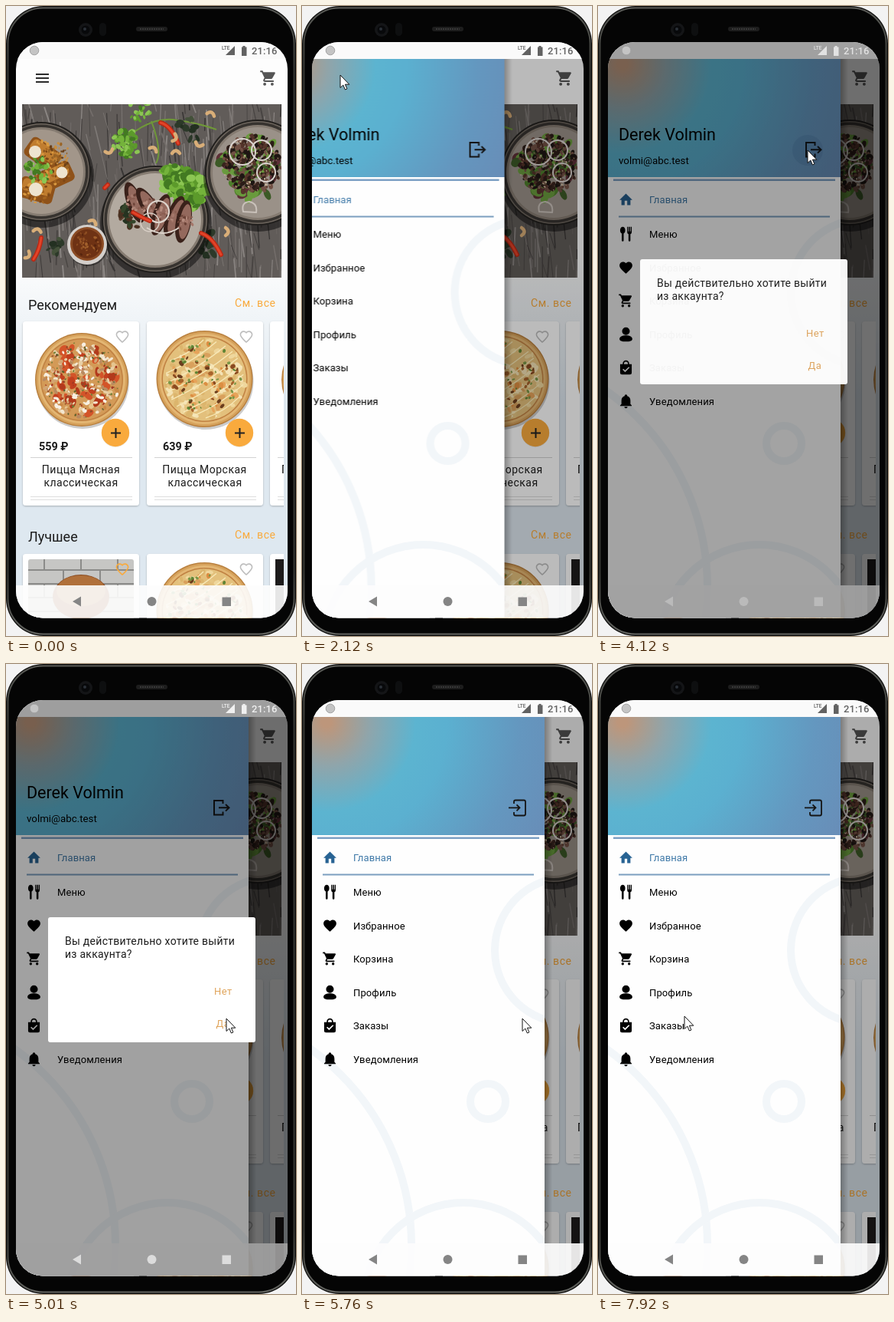
These frames come from a looping animation (379x821 px, 7.99 s). An HTML page:

```html
<!DOCTYPE html>
<html lang="ru">
<head>
<meta charset="utf-8">
<title>Пиццерия</title>
<style>
  html, body { margin: 0; width: 100%; height: 100%; overflow: hidden; background: #f3f3f3; }
  svg { display: block; width: 379px; height: 821px; font-family: Roboto, sans-serif; }
</style>
</head>
<body>
<svg id="stage" viewBox="0 0 379 821"></svg>
<script>
const LOOP = 7990;
const ORANGE = '#f9aa3d';

const randomizer = seed => () => (seed = (seed * 16807) % 2147483647) / 2147483647;

const text = (x, y, size, str, attrs = '') =>
  `<text x="${x}" y="${y}" font-size="${size}" ${attrs}>${str}</text>`;
const rect = (x, y, w, h, fill, attrs = '') =>
  `<rect x="${x}" y="${y}" width="${w}" height="${h}" fill="${fill}" ${attrs}/>`;
const circle = (x, y, r, fill, attrs = '') =>
  `<circle cx="${x}" cy="${y}" r="${r}" fill="${fill}" ${attrs}/>`;
const ring = (x, y, r, stroke, width) =>
  circle(x, y, r, 'none', `stroke="${stroke}" stroke-width="${width}"`);
const ellipse = (x, y, rx, ry, fill, turn = 0) =>
  `<ellipse rx="${rx}" ry="${ry}" fill="${fill}" transform="translate(${x} ${y}) rotate(${turn})"/>`;
const line = (d, stroke, width, attrs = '') =>
  `<path d="${d}" fill="none" stroke="${stroke}" stroke-width="${width}" ${attrs}/>`;
const icon = (d, x, y, scale, attrs = '') =>
  `<path d="${d}" transform="translate(${x - 12 * scale} ${y - 12 * scale}) scale(${scale})" ${attrs}/>`;

const ICONS = {
  cart: 'M7 18a2 2 0 1 0 0 4 2 2 0 0 0 0-4zM1 2v2h2l3.6 7.6-1.35 2.45C4.5 15.4 5.5 17 7 17h12v-2H7.4c-.2 0-.3-.2-.2-.4l.9-1.6h7.45c.75 0 1.4-.4 1.75-1L20.9 5.5A1 1 0 0 0 20 4H5.2l-.9-2zM17 18a2 2 0 1 0 0 4 2 2 0 0 0 0-4z',
  heart: 'M16.5 3c-1.7 0-3.4.8-4.5 2.1C10.9 3.8 9.2 3 7.5 3 4.4 3 2 5.4 2 8.5c0 3.8 3.4 6.9 8.5 11.5l1.5 1.3 1.5-1.3C18.6 15.4 22 12.3 22 8.5 22 5.4 19.6 3 16.5 3z',
  home: 'M10 21v-7h4v7h5v-8h3L12 3 2 13h3v8z',
  food: 'M7 1c5 0 5 9 1.5 10.5V22a1 1 0 0 1-3 0V11.5C2 10 2 1 7 1zM14 1h1.6v7h1V1h1.8v7h1V1H21v8c0 2-1 3-2 3.4V22a1 1 0 0 1-3 0v-9.6c-1-.4-2-1.4-2-3.4z',
  person: 'M12 1a6 6 0 1 0 0 12 6 6 0 0 0 0-12zM12 13.5C6 13.5 2 16 2 19s4 4 10 4 10-1 10-4-4-5.5-10-5.5z',
  bag: 'M7 7V6a5 5 0 0 1 10 0v1h4v13a3 3 0 0 1-3 3H6a3 3 0 0 1-3-3V7zM9 7h6V6a3 3 0 0 0-6 0zM8 14l-1.3 1.4 4 4 7-7L16.3 11l-5.6 5.5z',
  bell: 'M12 23a2.5 2.5 0 0 0 2.5-2.5h-5A2.5 2.5 0 0 0 12 23zm7-6.5V11c0-3.5-2-6.2-5-6.9V3.5a2 2 0 0 0-4 0v.6C7 4.8 5 7.5 5 11v5.5l-2 2v1h18v-1z'
};

function scatter(cx, cy, radius, count, size, colors, rnd) {
  let out = '';
  for (let i = 0; i < count; i++) {
    const a = rnd() * 6.283, d = radius * Math.sqrt(rnd()), s = size * (.6 + rnd() * .6);
    out += ellipse((cx + d * Math.cos(a)).toFixed(1), (cy + d * Math.sin(a)).toFixed(1),
      s.toFixed(1), (s * (.45 + rnd() * .4)).toFixed(1),
      colors[Math.floor(rnd() * colors.length)], Math.round(rnd() * 180));
  }
  return out;
}

const crust = (x, y, r, base) => circle(x + 1, y + 3, r, '#0003') + circle(x, y, r, '#b9803f') +
  circle(x, y, r - 1.5, '#d6a25c') + circle(x, y, r - 4, '#e3b673') + circle(x, y, r - 7, '#c08142') + circle(x, y, r - 8.5, base);

function meatPizza(x, y, r) {
  const rnd = randomizer(71);
  return crust(x, y, r, '#d39a57') +
    scatter(x, y, r - 12, 90, 3.5, ['#e6c58e', '#c98746', '#dcb27a'], rnd) +
    scatter(x, y, r - 15, 44, 6.5, ['#c2401f', '#d35429', '#b23a1c'], rnd) +
    scatter(x, y, r - 11, 190, 3, ['#f3e6cf', '#e8cfa6', '#d3a573', '#f8f0e2', '#b98a60'], rnd) +
    scatter(x, y, r - 11, 110, 1.6, ['#6f7c35', '#8f4a2a', '#a53822', '#59602d'], rnd);
}

function seaPizza(x, y, r) {
  const rnd = randomizer(29);
  let sauce = '';
  for (let i = -4; i <= 4; i++) {
    const half = Math.sqrt((r - 12) ** 2 - (i * 11) ** 2);
    sauce += `M${-half} ${i * 11}Q0 ${i * 11 + 6} ${half} ${i * 11}`;
  }
  return crust(x, y, r, '#e3c07c') +
    scatter(x, y, r - 11, 130, 4.5, ['#efd79d', '#f4e2b5', '#dcb56d', '#e6c684'], rnd) +
    scatter(x, y, r - 17, 44, 4, ['#dc8e42', '#e6a35a', '#d9a05c'], rnd) +
    line(sauce, '#f8eab9', 1.3, `transform="translate(${x} ${y}) rotate(-32)"`) +
    scatter(x, y, r - 18, 34, 3.4, ['#6b3d1d', '#8a4a20', '#a8642c'], rnd) +
    scatter(x, y, r - 15, 44, 2.2, ['#5f8434', '#7a9646'], rnd);
}

function hero() {
  const rnd = randomizer(11);
  let grain = '';
  for (let i = 0; i < 320; i++) {
    const x = 10 + rnd() * 360, y = 110 + rnd() * 230;
    grain += line(`M${x.toFixed(1)} ${y.toFixed(1)}l${(rnd() * 14 - 4).toFixed(1)} ${(14 + rnd() * 50).toFixed(1)}`,
      ['#7f7a77', '#484442', '#746e6b', '#393635', '#8b8683'][i % 5], (.5 + rnd() * 1.5).toFixed(1));
  }
  const plate = (x, y, r, fill) => circle(x + 1, y + 5, r + 3, '#0007') + circle(x, y, r, '#211f1d') +
    circle(x, y, r - 2, '#6d655d') + circle(x, y, r - 3.5, '#37332f') + circle(x, y, r - 7, '#857b71') + circle(x, y, r - 10, fill);
  const chili = d => line(d, '#b82814', 6, 'stroke-linecap="round"') + line(d, '#e24328', 3, 'stroke-linecap="round"');
  const cashew = (x, y, turn) => line('M-5 2Q0-5 5 2', '#d9ae78', 4.5,
    `stroke-linecap="round" transform="translate(${x} ${y}) rotate(${turn})"`);
  const greens = ['#5c9a2b', '#74b33b', '#437a22', '#8cc653'];
  const darkLeaves = ['#2c3929', '#233021', '#44513a'];
  const meat = ['#b58b7d', '#8a5d50', '#6b4237', '#a5786b'];
  return `<g clip-path="url(#heroClip)">${rect(21, 128, 339, 226, '#615c59')}${grain}` +
    line('M140 189Q180 145 218 148Q250 152 275 161M190 150Q205 190 196 205', '#6f9838', 2) +
    scatter(157, 180, 18, 46, 4.5, greens, rnd) + scatter(174, 136, 18, 24, 4, greens, rnd) +
    scatter(240, 163, 18, 12, 5, darkLeaves, rnd) +
    scatter(262, 311, 16, 18, 6, darkLeaves, rnd) + scatter(65, 312, 11, 10, 5, darkLeaves, rnd) +
    plate(46, 216, 65, '#a2968a') +
    [[48, 193, 35], [65, 222, -25], [40, 240, 15]].map(([x, y, a]) =>
      `<g transform="translate(${x} ${y}) rotate(${a})">${rect(-23, -14, 46, 28, '#8f5219', 'rx="6"')}${rect(-20, -12, 39, 16, '#c07d2f', 'rx="5"')}</g>` +
      scatter(x, y, 18, 34, 2.4, ['#d9993f', '#a4641f', '#7d4716'], rnd)).join('') +
    scatter(66, 197, 19, 60, 2.2, ['#9a6425', '#c98e3f', '#6b4018'], rnd) +
    scatter(42, 212, 18, 40, 3.8, greens, rnd) +
    circle(38, 190, 8, '#eee4cf') + circle(39, 239, 9, '#eee4cf') + circle(73, 217, 7.5, '#eee4cf') +
    plate(195, 278, 70, '#b3aaa0') +
    scatter(222, 226, 20, 60, 6, greens, rnd) + scatter(242, 242, 23, 90, 6.5, greens, rnd) +
    scatter(165, 272, 17, 44, 5, ['#34452a', '#4a3020', '#263321', '#5d4030'], rnd) +
    [[168, 256, 70], [187, 261, 58], [202, 272, 108], [220, 274, 112], [232, 281, 100]].map(([x, y, a]) =>
      ellipse(x, y, 28, 10, '#3a211a', a) + ellipse(x + 2, y, 23, 7, '#94695d', a) +
      scatter(x + 1, y, 11, 22, 2.2, meat, rnd)).join('') +
    ring(199, 268, 14, '#ded4cc', 2.2) + ring(188, 282, 12, '#d8cec5', 1.5) +
    line('M184 289Q205 303 226 289', '#ded4cc', 2) +
    plate(329, 217, 69, '#9a9188') +
    scatter(320, 211, 42, 70, 7, ['#4e7f2b', '#699a3d', '#5d2f36', '#3c5a26'], rnd) +
    scatter(322, 206, 38, 240, 3.6, ['#38241e', '#543429', '#1e1613', '#715044', '#2b1c17'], rnd) +
    scatter(322, 208, 38, 70, 1.4, ['#c9b49a', '#9c7d64'], rnd) +
    ring(309, 190, 17, '#d9d2ce', 2) + ring(334, 188, 13, '#d9d2ce', 2) + ring(340, 217, 12, '#d9d2ce', 2) +
    line('M310 268Q307 256 318 255Q329 257 327 269Z', '#c9c1ba', 2) +
    circle(107, 313, 26, '#0006') + circle(106, 311, 26, '#d3cfcb') + circle(106, 310, 22, '#8a4b24') +
    circle(106, 310, 19, '#6e3214') + scatter(106, 310, 16, 40, 1.8, ['#8d4d22', '#a2602c', '#57250e'], rnd) +
    chili('M202 152Q216 156 225 179') + chili('M255 296Q270 301 281 324') +
    chili('M46 302Q44 318 36 330') + chili('M166 269Q178 276 188 280') + chili('M129 237l4-4') +
    cashew(193, 186, 30) + cashew(222, 190, 0) + cashew(221, 172, 110) + cashew(268, 140, 20) + cashew(252, 181, 200) +
    cashew(289, 294, 90) + cashew(41, 292, 10) + cashew(29, 325, 120) + cashew(114, 281, 30) + cashew(135, 190, 160) + '</g>';
}

const outlineHeart = (x, y, color) => icon(ICONS.heart, x, y, .76, `fill="none" stroke="${color}" stroke-width="2.1"`);
const cardBox = (x, y) => rect(x, y, 152, 240, '#fff', 'rx="4" filter="url(#cardShadow)"');
const dishLine = (x, y, str) => text(x, y, 14, str, 'text-anchor="middle" fill="#1c1c1c" letter-spacing=".5"');

function dishCard(x, pizza, price, name) {
  const rule = (y, color) => rect(x + 10, y, 133, 1, color);
  return cardBox(x, 411) + pizza + outlineHeart(x + 130, 431, '#bdbdbd') +
    circle(x + 121, 557, 18.2, '#0001') + circle(x + 121, 556, 18.2, ORANGE) +
    line(`M${x + 115} 556.5h13M${x + 121.5} 550v13`, '#222', 2) +
    text(x + 21, 579, 14.4, price, 'font-weight="700" fill="#1c1c1c"') + rule(588, '#d2d2d2') + name +
    dishLine(x + 76, 626, 'классическая') + rule(639, '#dedede') + rule(643, '#dedede');
}

function burgerPhoto() {
  let bricks = '';
  for (let row = 0; row < 4; row++)
    bricks += line(`M29 ${735 + row * 18}h138M${50 + row % 2 * 25} ${717 + row * 18}v18m48-18v18m48-18v18`, '#8b8b89', 2);
  return `<g clip-path="url(#burgerClip)">${rect(29, 721, 138, 80, '#c6c6c4')}${bricks}` +
    ellipse(98, 770, 37, 29, '#8a4c22') + ellipse(98, 762, 32, 20, '#b0703a') + '</g>';
}

function home() {
  const title = (y, str) => text(29, y, 18, str, 'fill="#1c1c1c"') +
    text(299, y - 4, 14, 'См. все', `fill="${ORANGE}" letter-spacing=".6"`);
  return rect(13, 47, 355, 750, 'url(#appBg)') +
    line('M39 89h17M39 94h17M39 99h17', '#2b2b2b', 1.8) + icon(ICONS.cart, 343, 94, .98, 'fill="#555"') +
    hero() + title(396, 'Рекомендуем') + title(698, 'Лучшее') +
    '<g clip-path="url(#listClip)">' +
    dishCard(22, meatPizza(99, 487, 61), '559 ₽', dishLine(98, 609, 'Пицца Мясная')) +
    dishCard(184, seaPizza(259.5, 486, 63), '639 ₽',
      `<g id="seaName">${dishLine(259.5, 609, 'Пицца Морская')}</g><g id="newName">${dishLine(259.5, 609, 'Пицца Маргарита')}</g>`) +
    dishCard(345, meatPizza(421, 487, 61), '599 ₽', text(360, 609, 14, 'Пицца')) +
    cardBox(22, 714) + burgerPhoto() + outlineHeart(152, 734, ORANGE) +
    cardBox(184, 714) + seaPizza(259.5, 788, 63) + outlineHeart(314, 734, '#bdbdbd') +
    cardBox(345, 714) + rect(352, 721, 20, 80, '#1d1b1b') + '</g>';
}

function drawer() {
  const items = [['home', 'Главная', 252], ['food', 'Меню', 297], ['heart', 'Избранное', 341], ['cart', 'Корзина', 384],
    ['person', 'Профиль', 428], ['bag', 'Заказы', 471], ['bell', 'Уведомления', 515]];
  const menu = items.map(([name, label, y], i) =>
    icon(ICONS[name], 36.5, y, .84, `fill="${i ? '#000' : '#286393'}" fill-rule="evenodd"`) +
    text(67, y + 5, 13, label, `fill="${i ? '#000' : '#3f79a8'}" letter-spacing=".12"`)).join('');
  const pale = '#f2f6f9';
  return rect(317, 69, 10, 728, 'url(#edgeShadow)') +
    `<g clip-path="url(#drawerClip)">${rect(13, 69, 304, 728, '#fefefe')}` +
    ring(347, 373, 95, pale, 10) + ring(243, 570, 23, pale, 10) + ring(-170, 757, 313, pale, 10) + ring(211, 832, 130, pale, 10) +
    rect(13, 69, 304, 154, 'url(#header)') + rect(20, 225.5, 290, 2.5, '#7da0c4') + rect(27, 273.5, 276, 2, '#7c9fc0') +
    `<g id="account">${text(27, 175, 21.5, 'Derek Volmin')}${text(27, 206, 13.3, 'volmi@abc.test')}` +
    line('M283.5 182v-4h-11.5v18.5h11.5v-4M278 187.3h13M287 183l4.5 4.3-4.5 4.3', '#151515', 2) + '</g>' +
    `<g id="guest">${line('M277 182v-2.5q0-2 2-2h11q2 0 2 2v16q0 2-2 2h-11q-2 0-2-2v-2.5M270 187.3h14M280.5 183.3l4 4-4 4', '#151515', 1.8)}</g>` +
    circle(274, 188, 0, '#123a6b', 'id="ripple" opacity="0"') + menu + '</g>';
}

const dialog = () => rect(55, 330, 271, 163, '#fff', 'rx="3"') +
  text(77, 366, 14, 'Вы действительно хотите выйти', 'fill="#1c1c1c" letter-spacing=".27"') +
  text(77, 383, 14, 'из аккаунта?', 'fill="#1c1c1c" letter-spacing=".27"') +
  text(272, 431, 13, 'Нет', 'fill="#e0a55c" letter-spacing=".4"') +
  text(274.5, 473, 13, 'Да', 'fill="#e0a55c" letter-spacing=".4"');

const statusIcons = () => circle(37, 58, 5.8, '#c4c4c4', 'stroke="#a3a3a3"') +
  `<g id="status">${text(282, 57, 6.5, 'LTE', 'font-weight="500"')}<path d="M299 52v12h-12z"/>` +
  '<path d="M308 53.5h1.5V52h3v1.5h2V65H308z"/>' + text(321, 63, 13, '21:16', 'font-weight="500" letter-spacing=".1"') + '</g>';

const phone = () => rect(0, 0, 379, 821, '#0d0d0c', 'rx="49"') +
  rect(2.5, 2.5, 374, 816, '#050505', 'rx="46" stroke="url(#rim)" stroke-width="2"') +
  circle(104, 31, 9, '#141517') + circle(104, 31, 5.5, '#08090b') + circle(103, 30, 2, '#2b3138') +
  rect(122, 22, 9, 17, '#0e0f10', 'rx="4.5"') + rect(170, 27, 41, 6, '#1d1d1d', 'rx="3"') +
  line('M175 30h31', '#3a3a3a', 2, 'stroke-dasharray="2 1"');

const defs = `<defs>
  <clipPath id="screen"><rect x="13" y="47" width="355" height="750.5" rx="35"/></clipPath>
  <clipPath id="heroClip"><rect x="21" y="128" width="339" height="226"/></clipPath>
  <clipPath id="listClip"><rect x="16" y="405" width="347" height="400"/></clipPath>
  <clipPath id="burgerClip"><rect x="29" y="721" width="138" height="80" rx="3"/></clipPath>
  <clipPath id="drawerClip"><rect x="13" y="69" width="304" height="728"/></clipPath>
  <linearGradient id="rim" x2="0" y2="1"><stop stop-color="#5a5b57"/><stop offset=".1" stop-color="#373834"/>
    <stop offset=".9" stop-color="#373834"/><stop offset="1" stop-color="#62635f"/></linearGradient>
  <linearGradient id="appBg" x2="0" y2="1"><stop offset=".38" stop-color="#fdfdfd"/><stop offset=".62" stop-color="#dee8f0"/></linearGradient>
  <linearGradient id="edgeShadow"><stop stop-opacity=".28"/><stop offset="1" stop-opacity="0"/></linearGradient>
  <radialGradient id="header" gradientUnits="userSpaceOnUse" cx="32" cy="76" r="315">
    <stop offset=".02" stop-color="#bd967b"/><stop offset=".18" stop-color="#8fa5ab"/><stop offset=".37" stop-color="#5cb4d0"/>
    <stop offset=".5" stop-color="#5bb0d0"/><stop offset=".8" stop-color="#6497bf"/><stop offset="1" stop-color="#688eb8"/>
  </radialGradient>
  <filter id="cardShadow"><feDropShadow dx="0" dy="1" stdDeviation="1.2" flood-opacity=".25"/></filter>
</defs>`;

document.getElementById('stage').innerHTML = defs + phone() +
  `<g clip-path="url(#screen)">${home()}${rect(13, 69, 355, 728, '#000', 'id="scrim"')}
    <g id="drawer">${drawer()}</g>
    ${rect(13, 47, 355, 22, '#fafafa')}${rect(13, 755, 355, 43, '#fdfdfd', 'opacity=".9"')}
    ${rect(13, 47, 355, 751, '#000', 'id="dim"')}<g id="dialog">${dialog()}</g>${statusIcons()}
    <g id="nav"><path d="M98 769.5v13l-11-6.5z"/><circle cx="190.5" cy="776" r="6"/><path d="M282.5 770.5h11.5v11.5h-11.5z"/></g>
  </g>
  <path id="cursor" d="M0 0V16.5L3.8 13l2.6 6 2.5-1.1-2.5-5.7h5.4z" fill="#fff" stroke="#111" stroke-linejoin="round"/>`;

// Rows are [ms, value, easing]; the first and last values are held to the ends of the loop.
function track(id, prop, rows) {
  const frame = (ms, value, easing = 'linear') => ({ offset: ms / LOOP, [prop]: value, easing });
  const frames = [frame(0, rows[0][1]), ...rows.map(row => frame(...row)), frame(LOOP, rows.at(-1)[1])];
  document.getElementById(id).animate(frames, { duration: LOOP, iterations: Infinity });
}
const cut = (id, ms, from, to) => track(id, 'opacity', [[ms, from], [ms, to]]);

const SETTLE = 'cubic-bezier(.22,1,.36,1)';
track('drawer', 'transform', [[1932, 'translateX(-320px)', SETTLE], [2555, 'translateX(0px)']]);
track('scrim', 'opacity', [[1932, 0, SETTLE], [2555, .32]]);

track('ripple', 'r', [[3560, '0px'], [3630, '12px'], [3900, '20px']]);
track('ripple', 'opacity', [[3600, 0], [3630, .1], [4120, .1], [4260, 0]]);

track('dim', 'opacity', [[3830, 0], [4130, .37], [5490, .37], [5740, 0]]);
track('dialog', 'opacity', [[3860, 0], [4130, .99], [4200, 1], [5340, 1], [5500, 0]]);
track('status', 'fill', [[3860, '#626262'], [4150, '#f0f0f0'], [5560, '#f0f0f0'], [5750, '#626262']]);
track('nav', 'fill', [[3900, '#858585'], [4260, '#dcdcdc'], [5560, '#dcdcdc'], [5750, '#858585']]);

cut('account', 5340, 1, 0);
cut('guest', 5340, 0, 1);
cut('seaName', 5690, 1, 0);
cut('newName', 5690, 0, 1);

cut('cursor', 590, 0, 1);
track('cursor', 'transform', [
  [590, 9, 585], [800, 88, 400], [1000, 118, 220], [1280, 65, 81], [1410, 65, 81], [1480, 60, 78],
  [1640, 38, 89], [1760, 50, 90], [2260, 50, 90], [2680, 213, 187], [2750, 218, 183], [2960, 245, 177],
  [3230, 274, 188], [4480, 274, 188], [4780, 293, 340], [5010, 288, 462], [6720, 288, 462],
  [7170, 296, 416], [7390, 296, 416], [7920, 113, 459]
].map(([ms, x, y]) => [ms, `translate(${x}px, ${y}px)`, 'ease-in-out']));
</script>
</body>
</html>
```
